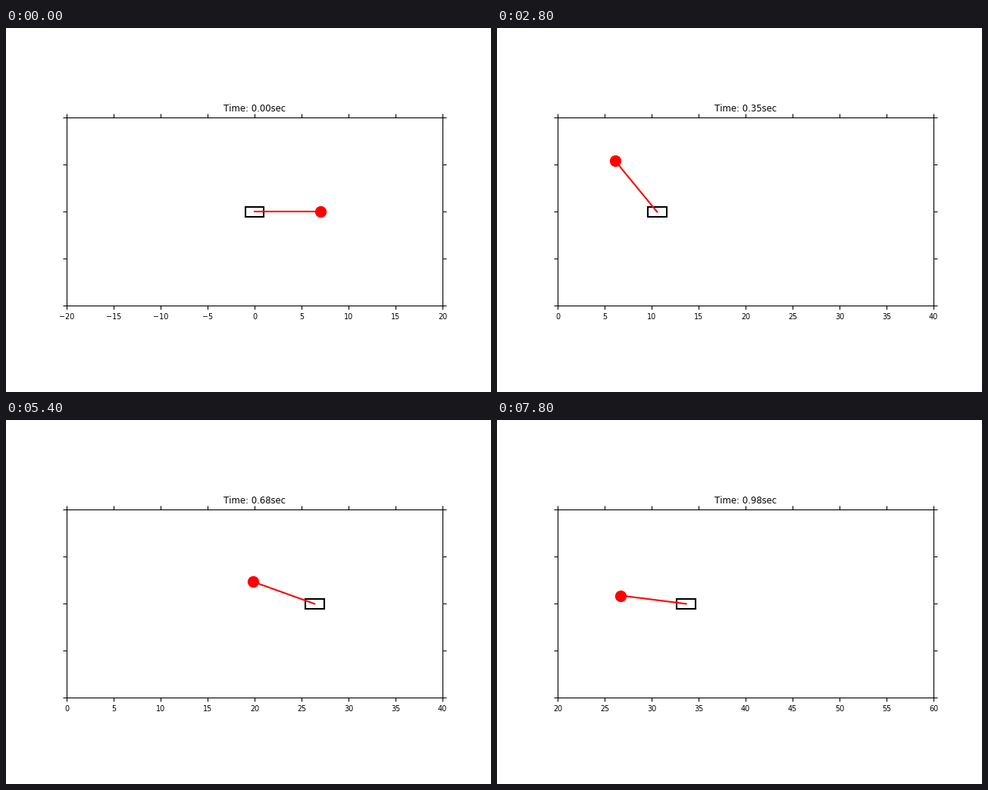
Write a matplotlib script that moves like this. It is 640 px wide and 480 px high and loops after 8000 ms.

```python
import numpy as np
import matplotlib.pyplot as plt
from matplotlib.animation import FuncAnimation
from matplotlib.patches import Rectangle

FRAMES = 40
INTERVAL = 200      # ms on screen per step
DT = 0.025          # simulated seconds per step
ROD = 7.0
CART_W, CART_H = 2.0, 1.0
HALF_VIEW = 20

# steps at which the motion changes character
FALL_END, PUSH_END, KICK_END = 8, 14, 19


def cart_pos(t):
    """Slow start, steady push, then coasting against quadratic drag."""
    if t <= FALL_END:
        return 1.82 * (t / FALL_END) ** 2.5
    if t <= PUSH_END:
        s = t - FALL_END
        return 1.82 + 0.83 * s + 0.105 * s ** 2
    drag, speed = 0.063, 2.087
    return 10.57 + np.log(1 + drag * speed * (t - PUSH_END)) / drag


def rod_angle(t):
    """Degrees from the +x axis, counter-clockwise."""
    if t <= FALL_END:       # clockwise fall
        return -150 * (t / FALL_END) ** 5
    if t <= PUSH_END:       # over the top and back again
        return -290.4 + 10.65 * (t - 11.63) ** 2
    if t <= KICK_END:       # speeding up through the bottom
        s = (t - PUSH_END) / (KICK_END - PUSH_END)
        return -230.7 + 214 * s ** 1.7
    s = t - KICK_END        # settling behind the braking cart
    return 180 - 38 * np.exp(-0.0831 * s) - 158.7 * np.exp(-0.834 * s)


plt.rcParams.update({"font.family": "DejaVu Sans", "font.size": 10,
                     "text.kerning_factor": 6})
fig = plt.figure(figsize=(6.4, 4.8), dpi=100, facecolor="white")
ax = fig.add_subplot()
ax.set_aspect("equal")
ax.set_xlim(-HALF_VIEW, HALF_VIEW)
ax.set_ylim(-10, 10)
ax.set_yticks(range(-10, 11, 5))
ax.tick_params(top=True, right=True, labelleft=False, labelsize="x-small")

title = ax.set_title("", fontsize="small")
cart = ax.add_patch(Rectangle((0, -CART_H / 2), CART_W, CART_H,
                              fill=False, ec="black", lw=1.5))
rod, = ax.plot([], [], color="red", lw=1.5)
bob, = ax.plot([], [], "o", color="red", ms=10)


def update(i):
    x = cart_pos(i)
    a = np.radians(rod_angle(i))
    bx, by = x + ROD * np.cos(a), ROD * np.sin(a)

    # the view jumps a half-width once the cart is 10 past its centre
    centre = HALF_VIEW * np.floor((x + HALF_VIEW / 2) / HALF_VIEW)
    left, right = centre - HALF_VIEW, centre + HALF_VIEW
    ax.set_xlim(left, right)
    ax.set_xticks(np.arange(left, right + 1, 5))

    cart.set_x(x - CART_W / 2)
    rod.set_data([x, bx], [0, by])
    bob.set_data([bx], [by])
    title.set_text(f"Time: {i * DT + 1e-9:.2f}sec")
    return cart, rod, bob, title


anim = FuncAnimation(fig, update, frames=FRAMES, interval=INTERVAL,
                     init_func=lambda: update(0), repeat=True,
                     repeat_delay=0, blit=False)
plt.show()
```
